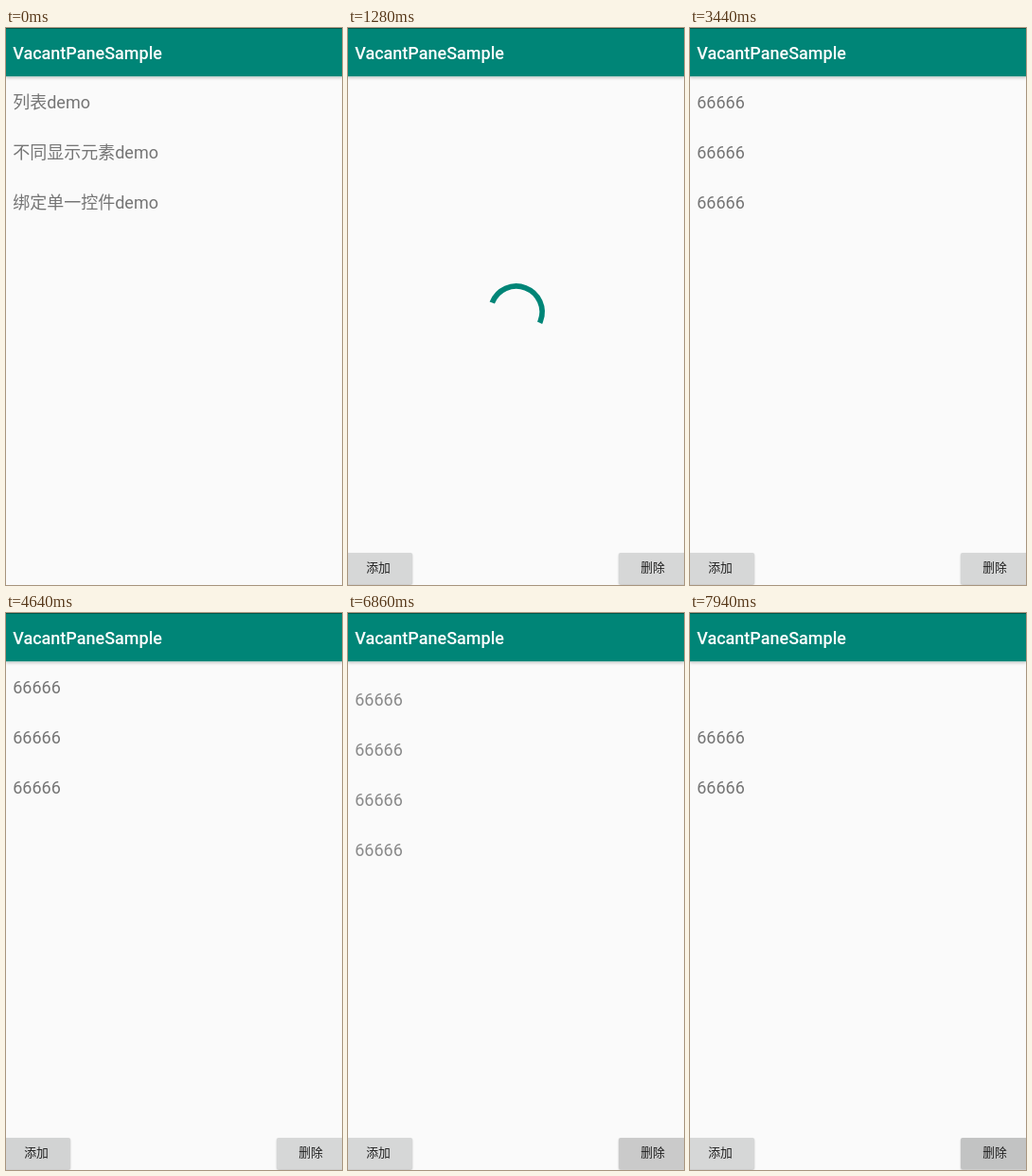
Write an HTML page with a canvas that moves like this. It is 355 px wide and 589 px high and loops after 8000 ms.

```html
<!DOCTYPE html>
<html lang="zh-CN">
<head>
<meta charset="utf-8">
<title>Empty list demo</title>
<style>
  html, body { margin: 0; width: 100%; height: 100%; overflow: hidden; background: #fafafa; }
  body { position: relative; font: 18px Roboto, "Noto Sans CJK SC", "Noto Sans CJK", sans-serif; }
  #stage { position: absolute; left: 0; top: 0; width: 355px; height: 589px; overflow: hidden; background: #fafafa; }
  #bar {
    position: absolute; left: 0; top: 0; width: 355px; height: 52px; box-sizing: border-box;
    background: #008577; border-top: 1px solid #00574b; border-bottom: 1px solid #b4cfcb;
    color: #fff; z-index: 2; font-weight: 500; line-height: 52px; padding-left: 7.2px; white-space: nowrap;
    box-shadow: 0 1px 3px rgba(0, 0, 0, .2);
  }
  .row {
    position: absolute; left: 7.2px; top: 52px; height: 53px; line-height: 53px;
    color: #757575; white-space: nowrap;
  }
  .btn {
    position: absolute; top: 555px; width: 72px; height: 33px; line-height: 31px;
    border-radius: 2px; background: #d6d7d7; color: #212121; font-size: 12.8px; text-align: center;
    box-shadow: 0 1px 2px rgba(0, 0, 0, .24);
  }
  #add { left: -4px; }
  #del { left: 286px; }
  canvas { position: absolute; left: 142px; top: 265px; width: 71px; height: 71px; }
</style>
</head>
<body>
<div id="stage">
  <div id="bar">VacantPaneSample</div>
  <div id="menu"></div>
  <div id="page">
    <canvas id="ring"></canvas>
    <div id="list"></div>
    <div class="btn" id="add">添加</div>
    <div class="btn" id="del">删除</div>
  </div>
</div>
<script>
const LOOP = 8000, STEP = 60, ROW = 53;
const OPEN = 500, LOADED = 3200;
const $ = id => document.getElementById(id);
const clamp = v => Math.min(1, Math.max(0, v));
const ramp = (t, from, to) => clamp((t - from) / (to - from));
const smooth = p => (1 - Math.cos(Math.PI * p)) / 2;

// fade-in span of each list row
const arrivals = [[3140, 3380], [3140, 3380], [3140, 3380], [4840, 4990], [5730, 5840]];
// each removal: fade start, slide start, slide end
const removals = [[6573, 6693, 6943], [7220, 7340, 7580], [7780, 8000, 8250]];

const addTints = [[0, '#d6d7d7'], [4640, '#d2d3d3'], [5480, '#d0d0d0'], [6560, '#d6d7d7']];
const delTints = [[0, '#d6d7d7'], [6560, '#cdcdcd'], [6680, '#cacaca'],
                  [7280, '#c6c7c7'], [7760, '#c4c5c5'], [7820, '#c2c3c3']];

function addRow(parent, text, i) {
  const el = document.createElement('div');
  el.className = 'row';
  el.textContent = text;
  el.style.transform = `translateY(${i * ROW}px)`;
  parent.appendChild(el);
  return el;
}

['列表demo', '不同显示元素demo', '绑定单一控件demo'].forEach((s, i) => addRow($('menu'), s, i));
const rows = arrivals.map((_, i) => addRow($('list'), '66666', i));

const ring = $('ring'), ctx = ring.getContext('2d');
const scale = Math.max(1, window.devicePixelRatio || 1);
ring.width = ring.height = Math.round(71 * scale);

// y on a cubic curve with end heights 0 and 1, found from x
function curve(x, x0, x1, x2, x3) {
  if (x <= x0) return 0;
  if (x >= x3) return 1;
  let lo = 0, hi = 1;
  for (let i = 0; i < 24; i++) {
    const s = (lo + hi) / 2, r = 1 - s;
    const cx = x0 * r * r * r + 3 * x1 * s * r * r + 3 * x2 * s * s * r + x3 * s * s * s;
    if (cx < x) lo = s; else hi = s;
  }
  return lo * lo * (3 - 2 * lo);
}

function drawRing(t) {
  ctx.setTransform(scale, 0, 0, scale, 0, 0);
  ctx.clearRect(0, 0, 71, 71);
  if (t >= LOADED) return;
  const cycles = Math.max(0, 0.641 + (t - 1280) * 0.000777);
  const u = cycles % 1;
  const base = 0.25 * u + 0.6 * cycles + 8.8 / 360 - 0.25;
  const tail = 0.75 * curve(u, 0.5, 0.7, 0.6, 1);
  const head = 0.75 * curve(u, 0, 0.2, 0.1, 0.5);
  ctx.beginPath();
  ctx.arc(35.8, 35.3, 27.3, (base + tail) * 2 * Math.PI, (base + Math.max(head, tail + 0.003)) * 2 * Math.PI);
  ctx.lineWidth = 5.7;
  ctx.strokeStyle = '#008577';
  ctx.stroke();
}

function drawRows(t) {
  let shift = 0, moving = false;
  for (const [, from, to] of removals) {
    const p = ramp(t, from, to);
    shift += smooth(p);
    if (p > 0 && p < 1) moving = true;
  }
  rows.forEach((el, i) => {
    let alpha = ramp(t, ...arrivals[i]);
    if (removals[i]) alpha *= 1 - ramp(t, removals[i][0], removals[i][0] + 120);
    if (moving) alpha *= 0.84;
    el.style.opacity = alpha;
    el.style.transform = `translateY(${Math.round((i - shift) * ROW)}px)`;
  });
}

const tint = (t, list) => list.filter(([at]) => t >= at).pop()[1];

function render(now) {
  const raw = now % LOOP;
  // the screen refreshes in even steps
  const t = Math.max(0, 20 + STEP * Math.floor((raw - 20) / STEP));
  const opened = t >= OPEN;
  $('menu').style.display = opened ? 'none' : 'block';
  $('page').style.display = opened ? 'block' : 'none';
  if (opened) {
    drawRing(t);
    drawRows(t);
    $('add').style.background = tint(t, addTints);
    $('del').style.background = tint(t, delTints);
  }
}

const start = performance.now();
function tick() {
  render(performance.now() - start);
  requestAnimationFrame(tick);
}
tick();
</script>
</body>
</html>
```
